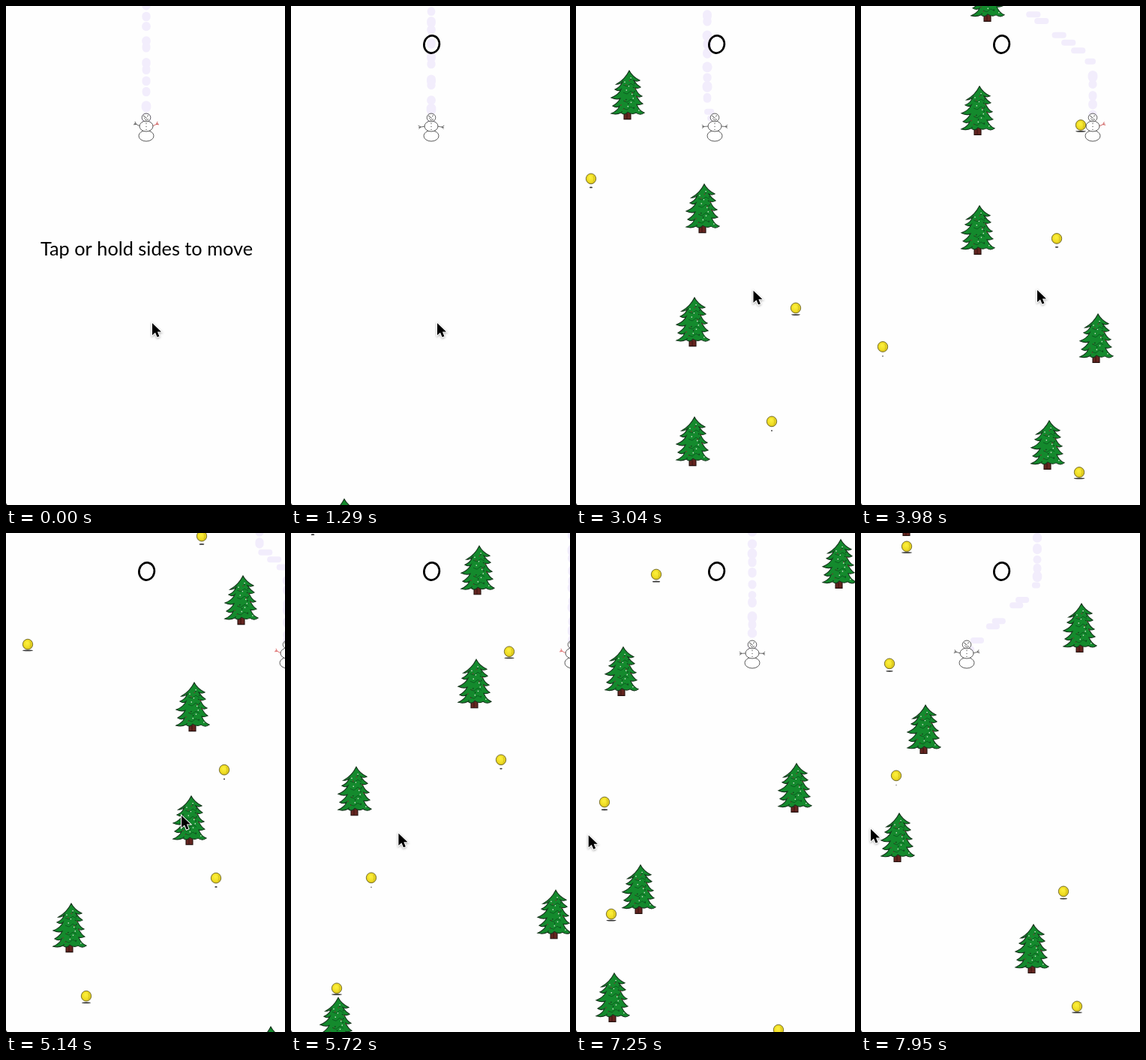
Animation of 372 by 664 pixels, one loop 8000 ms. Source, as an HTML page with a canvas:

```html
<!DOCTYPE html>
<html lang="en">
<head>
<meta charset="utf-8">
<title>Snowman run</title>
<style>
  html, body { margin: 0; width: 100%; height: 100%; overflow: hidden; background: #fefefe; }
  canvas { display: block; width: 100vw; height: 100vh; }
</style>
</head>
<body>
<canvas id="stage" width="372" height="664"></canvas>
<script>
const ctx = document.getElementById('stage').getContext('2d');
const WIDTH = 372, HEIGHT = 664, LOOP = 8000, STEP = 116.72;
const GAME_START = 1045;
const COIN_SPEED = 0.8655; // relative to the trees

// Rows of [time, ...values]
const SCROLL = [[2218, 0], [3035, 266], [3968, 547], [5136, 900], [6420, 1300], [7937, 1761]];
const SNOWMAN = [[0, 187], [2110, 187], [2145, 175], [2990, 175], [3020, 185], [3370, 185],
  [3700, 309], [4200, 309], [4280, 338], [4685, 338], [4785, 375], [6205, 375],
  [6420, 290], [6565, 235], [7660, 235], [7937, 141]];
const CURSOR = [[0, 195, 422], [1300, 195, 422], [1950, 89, 389], [2260, 89, 389],
  [2750, 237, 379], [3968, 235, 378], [5136, 234, 376], [5500, 232, 380],
  [6000, 30, 425], [6420, 54, 430], [7000, 18, 405], [7937, 13, 394]];

// Tip x and y, measured where the scroll is zero
const TREES = [[71, 352], [171, 503], [158, 654], [158, 813], [316, 957], [251, 1099],
  [247, 1250], [87, 1393], [353, 1557], [63, 1700], [294, 1855], [86, 1990],
  [51, 2134], [230, 2282]];
// Centre x, y and phase of the shadow
const COINS = [[20, 460, .59], [293, 632, .12], [261, 783, .86], [29, 927, .61],
  [291, 1094, .19], [280, 1238, .94], [107, 1395, .73], [38, 1698, .15],
  [61, 1542, .33], [47, 1847, .83], [270, 2001, .56], [288, 2154, .33]];

const FOLIAGE = new Path2D(`M0 0 Q4 8 14 13 Q10 15 6 13 Q10 19 15 22 Q12 24 8 23
  Q11 31 17 34 Q13 36 10 34 Q13 41 18 44 Q14 46 10 45 Q13 53 20 56 Q15 60 9 56
  Q4 59 -2 55 Q-6 60 -11 56 Q-17 59 -24 57 Q-15 53 -13 47 Q-17 50 -22 47
  Q-15 43 -12 37 Q-17 39 -24 36 Q-14 32 -11 25 Q-14 28 -19 25 Q-12 22 -9 15
  Q-12 18 -17 18 Q-6 12 0 0Z`);
const ARROW = new Path2D('M0 0V16L4 12.6L6.6 18.6L9.4 17.4L6.9 11.6H12Z');

const random = n => {
  const v = Math.sin(n * 127.1 + 11.7) * 43758.5453;
  return v - Math.floor(v);
};

// Linear interpolation that also continues the end segments
function sample(rows, t) {
  let i = 1;
  while (i < rows.length - 1 && rows[i][0] < t) i++;
  const a = rows[i - 1], b = rows[i];
  const k = (t - a[0]) / (b[0] - a[0]);
  return a.slice(1).map((v, j) => v + (b[j + 1] - v) * k);
}
const scrollAt = t => sample(SCROLL, t)[0];
const snowmanX = t => sample(SNOWMAN, t)[0];

function ellipse(x, y, rx, ry, fill, stroke, tilt = 0) {
  ctx.beginPath();
  ctx.ellipse(x, y, rx, ry, tilt, 0, 7);
  if (fill) { ctx.fillStyle = fill; ctx.fill(); }
  if (stroke) { ctx.strokeStyle = stroke; ctx.stroke(); }
}

function line(color, ...points) {
  ctx.strokeStyle = color;
  ctx.beginPath();
  for (let i = 0; i < points.length; i += 2) ctx.lineTo(points[i], points[i + 1]);
  ctx.stroke();
}

function at(x, y, draw) {
  ctx.save();
  ctx.translate(x, y);
  draw();
  ctx.restore();
}

function drawTrail(t) {
  const gap = 45, last = Math.floor(t / gap);
  ctx.lineCap = 'round';
  for (let k = last - 14; k <= last; k++) {
    const born = (k + random(k) * 0.6 - 0.3) * gap;
    if (born > t) continue;
    const x = snowmanX(born), end = snowmanX(Math.min(t, born + 30));
    const y = 160 - scrollAt(t) + scrollAt(born);
    const moving = Math.abs(end - x) > 2;
    ctx.lineWidth = moving ? 8 : 10.5 + random(k + 50) * 2.5;
    line('#f2edfc', x, y, end, y + (moving ? 0 : random(k + 90) * 3 + 0.1));
  }
  ctx.lineCap = 'butt';
}

function drawArm(side, angle, color) {
  ctx.save();
  ctx.scale(side, 1);
  ctx.translate(8, 0);
  ctx.rotate(-angle);
  line(color, 0, 0, 9, 0);
  line(color, 9, -2.5, 6, 0, 9, 2);
  ctx.restore();
}

function drawSnowman(t) {
  const angle = (8 + 18 * Math.cos(t / 285.4 * 2 * Math.PI)) * Math.PI / 180;
  const leftRed = t > 4500 && t < 5800;
  const rightRed = t < GAME_START || (t > 3400 && t < 7000);
  at(snowmanX(t), 160, () => {
    ctx.lineWidth = 0.8;
    drawArm(-1, angle, leftRed ? '#d66' : '#555');
    drawArm(1, angle, rightRed ? '#c55' : '#555');
    ellipse(0, 12.8, 10, 7.2, '#fff', '#333');
    ellipse(0, 0, 9, 7, '#fff', '#333');
    ellipse(0, -11.5, 5.8, 5.5, '#fff', '#333');
    line('#333', -4, -14, -1, -12.5);
    line('#333', 1, -13, 3, -14.5);
    line('#555', -3, -10.5, 0, -11.5, 1, -10);
    line('#333', -2, -8.5, 1, -8, 3, -9.5);
    ctx.fillStyle = '#333';
    for (const y of [-4, 0, 4]) ctx.fillRect(-0.5, y, 1, 1);
  });
}

function drawCoin(x, y, phase) {
  const lift = 0.5 - 0.5 * Math.cos(phase * 2 * Math.PI);
  at(x, y, () => {
    ellipse(0, 8.2 + lift * 4.5, 7 * (1 - lift) + 0.3, 0.9, '#333');
    const gold = ctx.createRadialGradient(-1, -2, 1, 0, 0, 7);
    gold.addColorStop(0, '#fbee3b');
    gold.addColorStop(0.7, '#eedb23');
    gold.addColorStop(1, '#c5ae18');
    ctx.lineWidth = 0.8;
    ellipse(0, 0, 6.7, 6.9, gold, '#625c1e');
    line('rgba(125,110,10,.35)', 3, -4, 4, 0, 3, 4);
  });
}

function drawTree(x, y) {
  at(x, y, () => {
    ctx.lineWidth = 1.1;
    ctx.fillStyle = '#652520';
    ctx.strokeStyle = '#251310';
    ctx.beginPath();
    ctx.rect(-7, 54, 9, 10.5);
    ctx.fill();
    ctx.stroke();
    line('#3b1512', -3, 57, -3, 64);
    ctx.fillStyle = '#148a2d';
    ctx.strokeStyle = '#16351c';
    ctx.fill(FOLIAGE);
    ctx.stroke(FOLIAGE);
    ctx.lineWidth = 0.9;
    for (let i = 0; i < 26; i++) {
      const py = 9 + i * 1.8, px = -1 + (random(i) - 0.5) * (8 + py * 0.4);
      ctx.fillStyle = ['#d9e8d5', '#12391c', '#7a3430'][i % 3];
      ctx.fillRect(px, py, 1.4, 1.4);
    }
    for (const py of [17, 27, 38, 48]) line('#0c5a20', -8, py + 2, -3, py + 4, 2, py, 7, py + 3);
  });
}

function drawCursor(t) {
  const [x, y] = sample(CURSOR, t);
  at(x, y, () => {
    ctx.shadowColor = 'rgba(0,0,0,.35)';
    ctx.shadowBlur = 3;
    ctx.shadowOffsetY = 1;
    ctx.lineWidth = 2;
    ctx.strokeStyle = '#fff';
    ctx.stroke(ARROW);
    ctx.shadowColor = 'transparent';
    ctx.fillStyle = '#000';
    ctx.fill(ARROW);
  });
}

function draw(t) {
  const scroll = scrollAt(t);
  ctx.fillStyle = '#fefefe';
  ctx.fillRect(0, 0, WIDTH, HEIGHT);
  drawTrail(t);
  drawSnowman(t);
  if (t < GAME_START) {
    ctx.fillStyle = '#000';
    ctx.font = '25.3px Lato, sans-serif';
    ctx.textAlign = 'center';
    ctx.fillText('Tap or hold sides to move', 187.5, 332);
  } else {
    for (const [x, y, phase] of COINS) drawCoin(x, y - scroll * COIN_SPEED, t / 450 + phase);
    for (const [x, y] of TREES) drawTree(x, y - scroll);
    ctx.lineWidth = 2.7;
    ellipse(187.6, 51, 10.2, 11.6, null, '#000', 0.2);
  }
  drawCursor(t);
  ellipse(0, HEIGHT, 1.5, 2, '#333');
}

function frame(now) {
  draw(Math.floor((now % LOOP) / STEP) * STEP);
  requestAnimationFrame(frame);
}
requestAnimationFrame(frame);
</script>
</body>
</html>
```
